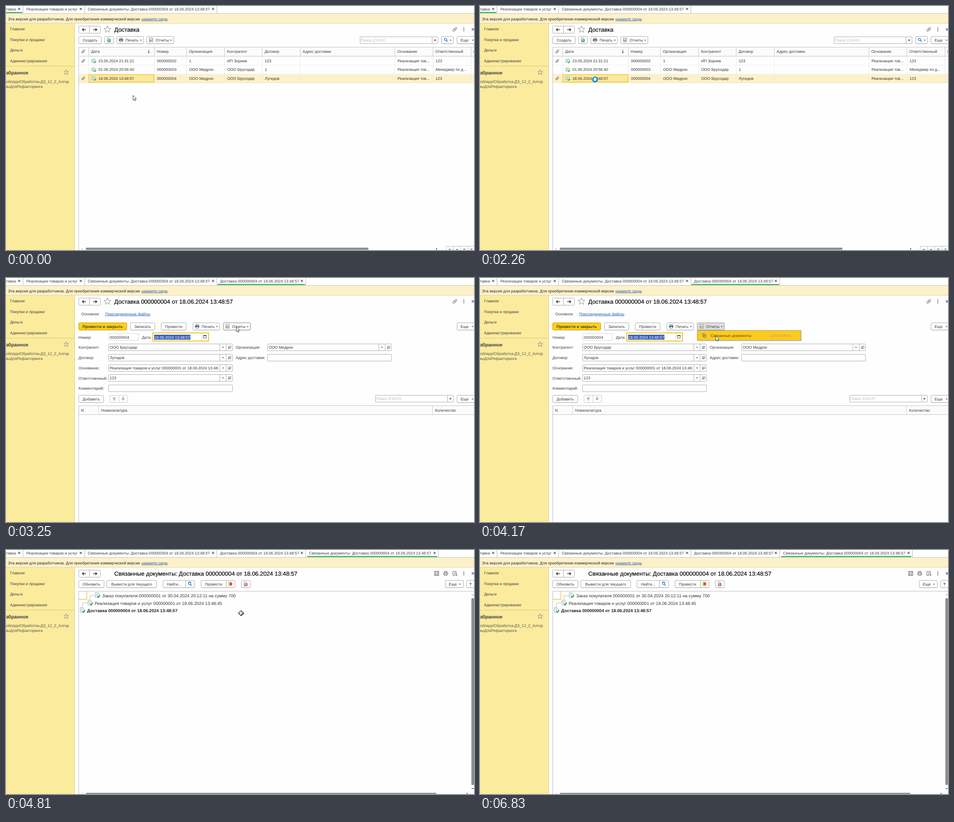
An HTML page that plays this animation: 1033 by 542 pixels, repeating every 7960 ms.

```html
<!DOCTYPE html>
<html lang="ru">
<head>
<meta charset="utf-8">
<title>Доставка</title>
<style>
  html, body { margin: 0; width: 100%; height: 100%; overflow: hidden; background: #fefefe; }
  svg { display: block; width: 100%; height: 100%; }
  text { font-family: "Liberation Sans", Arial, sans-serif; text-rendering: geometricPrecision; white-space: pre; }
</style>
</head>
<body>
<svg id="stage" viewBox="0 0 1033 542" xmlns="http://www.w3.org/2000/svg"></svg>
<script>
const LOOP = 7960, SIZE = 8.6;
const INK = '#3c3c3c', EDGE = '#adadad', GOLD = '#f3c52c', LINK = '#2a5db0', GREEN = '#19a04b', HEAD = '#fbfbfb';

// Drawing helpers; y of a text is the middle of its capitals.
const text = (x, y, s, o = {}) =>
  `<text x="${x}" y="${y + (o.size || SIZE) * .36}" font-size="${o.size || SIZE}" fill="${o.fill || INK}"` +
  ` text-anchor="${o.anchor || 'start'}" font-weight="${o.bold ? 700 : 400}"` +
  `${o.under ? ' text-decoration="underline"' : ''}>${s}</text>`;
const rect = (x, y, w, h, fill, stroke = 'none', r = 0, sw = 1) =>
  `<rect x="${x}" y="${y}" width="${w}" height="${h}" rx="${r}" fill="${fill}" stroke="${stroke}" stroke-width="${sw}"/>`;
const path = (d, stroke = INK, sw = 1, fill = 'none') =>
  `<path d="${d}" stroke="${stroke}" stroke-width="${sw}" fill="${fill}"/>`;
const vline = (x, y1, y2, c = '#d0d0d0') => path(`M${x} ${y1}V${y2}`, c);
const hline = (y, x1, x2, c = '#d0d0d0') => path(`M${x1} ${y}H${x2}`, c);
const at = (x, y, s) => `<g transform="translate(${x} ${y})">${s}</g>`;
const group = (id, s) => `<g id="${id}">${s}</g>`;

const caret = (x, y) => path(`M${x - 2} ${y - 1}h4l-2 2.3z`, 'none', 0, '#444');
const cross = (x, y, r = 2.4, c = '#444') =>
  path(`M${x - r} ${y - r}l${2 * r} ${2 * r}m0 ${-2 * r}l${-2 * r} ${2 * r}`, c, 1.2);
const star = (x, y, r) => {
  let d = '';
  for (let i = 0; i < 10; i++) {
    const a = i * Math.PI / 5, q = i % 2 ? r * .42 : r;
    d += (i ? 'L' : 'M') + (x + q * Math.sin(a)).toFixed(2) + ' ' + (y - q * Math.cos(a)).toFixed(2);
  }
  return path(d + 'z', '#777', .8, 'none');
};
const arrow = (x, y, dir) =>
  path(`M${x - 4 * dir} ${y}H${x + 3 * dir}M${x + .8 * dir} ${y - 3}L${x + 4 * dir} ${y}L${x + .8 * dir} ${y + 3}`, '#333', 1.6);
const tri = (x, y, d, c = '#888') => path(`M${x - 3} ${y + 1.5 * d}h6l-3 ${-3 * d}z`, 'none', 0, c);
const fatArrow = (x, y, d) => path(`M${x - 4} ${y}h2.6v${4 * d}h2.8v${-4 * d}h2.6l-4 ${-4 * d}z`, 'none', 0, '#b0b0b0');

function button(x, y, w, label, o = {}) {
  const tx = o.icon ? x + 20 : x + w / 2;
  return rect(x + .5, y + 1.5, w - 1, 16, '#d8d8d8', 'none', 2) +
    rect(x + .5, y + .5, w - 1, 16, o.fill || '#fdfdfd', o.edge || EDGE, 2) +
    (label ? text(tx, y + 9, label, { anchor: o.icon ? 'start' : 'middle', bold: o.bold, size: o.size }) : '') +
    (o.icon ? at(x + 10, y + 8.5, o.icon) : '') +
    (o.drop ? caret(x + w - 6.5, y + 9) : '');
}
// Button cut off by the right edge of the window.
const more = y => button(995, y, 44, '') + text(1003.5, y + 9, 'Еще') + caret(1030, y + 9);

const clip = path('M2.8-.7L-.9 3.1a1.8 1.8 0 0 1-2.6-2.6L.8-3.7a1.2 1.2 0 0 1 1.8 1.8L-1.4 2a.6.6 0 0 1-.9-.9L1-2', '#555', .8);
const docIcon = rect(-4.5, -3.8, 8, 7, '#f4f8f6', '#8b9da0', .5, .8) +
  path('M-3-1.8h5M-3 0h5M-3 1.8h2.5', '#8b9da0', .7) + path('M.5 2.3l1.8 2L5.3.6', GREEN, 1.6);
const treeIcon = path('M-5-5.5h6l2.5 2.5v8.5h-8.5z', '#8d999c', .8, '#f7f9f9') +
  path('M-3.2-2.5h4.5M-3.2-.5h4.5M-3.2 1.5h3', '#9aa7aa', .7) + path('M-.4 2.6l2 2.3L5.6.5', '#15a340', 2);
const printIcon = rect(-2.8, -4.3, 5.6, 3, '#fff', '#50616e', 0, .9) +
  rect(-4.7, -1.7, 9.4, 4, '#46627d', 'none', 1) + rect(-2.5, .8, 5, 3.5, '#fff', '#46627d', 0, .8);
const reportIcon = rect(-3.7, -4.3, 7.4, 8.4, '#fff', '#777', 0, .9) +
  path('M-1.6 2.6v-4', '#d14a3e', 1.4) + path('M.3 2.6v-2.5', '#3e8a50', 1.4) + path('M2 2.6v-5', '#e0a526', 1.2);
const page = path('M-3.3-4.5h4.2l2.4 2.4v6.6h-6.6z', '#75807a', .9, '#fff');
const copyIcon = page + `<circle cx=".8" cy="1.2" r="3" fill="${GREEN}"/>` + path('M-1 1.2h3.6M.8-.6v3.6', '#fff', .9);
const dropIcon = page + '<circle cx=".6" cy="1.3" r="3" fill="#cf3434"/>' + cross(.6, 1.3, 1.2, '#fff');
const lens = `<circle cx="-.8" cy="-1" r="2.6" fill="#fff" stroke="#2f6fb2" stroke-width="1.3"/>` + path('M1.2 1l2.8 2.8', '#2f6fb2', 1.6);
const linkIcon = `<g transform="rotate(-42)">` + rect(-5.4, -2, 6, 4, 'none', '#777', 2) + rect(-.6, -2, 6, 4, 'none', '#777', 2) + '</g>';
const openIcon = rect(-1.2, -2.8, 4, 4, '#fff', '#555', 0, .8) + path('M-1.2-.8h-1.6v3.6h3.8v-1.6', '#555', .8);
const dots = x => [-3.2, 0, 3.2].map(d => `<circle cx="${x}" cy="${52 + d}" r="1" fill="#444"/>`).join('');

function search(x, y) {
  return rect(x + .5, y + .5, 172, 15, '#fff', EDGE, 1.5) + vline(x + 159.5, y, y + 16, EDGE) +
    text(x + 2, y + 8, 'Поиск (Ctrl+F)', { fill: '#b9b9b9' }) + cross(x + 166, y + 8, 1.7);
}

function heading(title, favourite = true) {
  return rect(160.5, 44.5, 48, 16, '#fdfdfd', EDGE, 2) + vline(184.5, 45, 60, EDGE) +
    arrow(172.5, 52.5, -1) + arrow(196.5, 52.5, 1) +
    (favourite ? star(224, 52, 8) + at(990.5, 52, linkIcon) : '') +
    `<g stroke="#000" stroke-width=".2">${text(239, 52.3, title, { size: 12.9, fill: '#000' })}</g>` +
    dots(1010.5) + cross(1031, 52, 2.8);
}

function tab(x, right, label, end) {
  return (end ? text(end, 6.5, label, { anchor: 'end' }) : text(x, 6.5, label)) +
    cross(right - 8, 6.5, 2.3) + vline(right + .5, 0, 16, '#b8b8b8');
}
const underline = (x, w) => rect(x, 13.5, w, 2, GREEN);

const DOC = 'Доставка 000000004 от 18.06.2024 13:48:57';
const LINKED = 'Связанные документы: ' + DOC;
const FIRM = 'ООО Мидрон', BUYER = 'ООО Брусодар', DEAL = 'Лугидов';

function frame() {
  let s = rect(0, 0, 1033, 542, '#fefefe') + hline(16.5, 0, 1033, '#c4c4c4') +
    tab(0, 37, 'Доставка', 22) + tab(45, 173, 'Реализации товаров и услуг') + tab(180.5, 465, LINKED) +
    rect(0, 17, 1033, 21.5, '#fdf1c8') + hline(38.5, 0, 1033, '#ddd3ad') +
    text(4, 28.5, 'Эта версия для разработчиков. Для приобретения коммерческой версии', { fill: '#222' }) +
    text(299, 28.5, 'нажмите сюда', { fill: LINK, under: true }) + text(357, 28.5, '.') +
    rect(0, 39, 151, 503, '#fbeb9d') + vline(151.5, 39, 542, '#d9cd92') + hline(133.5, 0, 151, '#d9c97c');
  ['Главное', 'Покупки и продажи', 'Деньги', 'Администрирование'].forEach((m, i) => s += text(9, 51.3 + i * 23.4, m));
  return s + text(49.5, 147.8, 'Избранное', { size: 10.75, bold: true, anchor: 'end' }) + star(133, 147.5, 5.8) +
    text(139, 167.5, 'e1cib/app/Обработка.ДЗ_12_2_Алгор', { anchor: 'end', fill: '#555' }) +
    text(81, 178.5, 'итмыДляРефакторинга', { anchor: 'end', fill: '#555' });
}

function listPage() {
  const cols = [182.5, 327.5, 398.5, 482.5, 565.5, 649.5, 858.5, 942.5, 1026.5];
  const names = ['Дата', 'Номер', 'Организация', 'Контрагент', 'Договор', 'Адрес доставки', 'Основание', 'Ответственный', 'Комментарий'];
  const rows = [
    ['23.05.2024 21:31:21', '000000002', '1', 'ИП Зорнев', '123', '', 'Реализация тов...', '123'],
    ['01.06.2024 20:56:40', '000000003', FIRM, BUYER, '1', '', 'Реализация тов...', 'Менеджер по д...'],
    ['18.06.2024 13:48:57', '000000004', FIRM, BUYER, DEAL, '', 'Реализация тов...', '123']
  ];
  let s = underline(0, 36) + heading('Доставка') + button(160, 67, 51, 'Создать') +
    button(217, 67, 21, '', { icon: copyIcon }) + button(244, 67, 60, 'Печать', { icon: printIcon, drop: true }) +
    button(310, 67, 61, 'Отчеты', { icon: reportIcon, drop: true }) + search(781, 68) +
    button(961, 67, 27, '', { icon: lens, drop: true }) + more(67) +
    rect(160.5, 91.5, 900, 20, HEAD, '#c4c4c4') + rect(161, 151.5, 872, 18.5, '#fdf1c8') +
    hline(131.5, 161, 1033, '#efefef') + hline(151, 161, 1033, '#efefef') + hline(170.5, 161, 1033, '#eee3bb') +
    vline(160.5, 91, 542, '#bdbdbd') + at(171, 101, clip);
  cols.forEach((x, i) => s += vline(x, 92, 111, '#c8c8c8') + vline(x, 112, 170, '#eaeaea') + text(x + 5.2, 101.3, names[i]));
  s += rect(183, 152.5, 143.5, 16.5, '#fbe99b', GOLD, 0, 1.4) +
    path('M315.2 97v7.2m-2-2.2l2 2.3 2-2.3', '#444', 1);
  rows.forEach((r, i) => {
    const y = 122 + i * 19.4;
    s += at(193.5, y, docIcon) + (i !== 1 ? at(171, y, clip) : '');
    r.forEach((v, k) => s += text(k ? cols[k] + 5.7 : 204, y, v, { fill: '#333' }));
  });
  s += rect(176, 536.8, 624, 4.8, '#8c8c8c', 'none', 2) + path('M169 537.5v4l-2.2-2z', 'none', 0, '#aaa') +
    path('M949.5 537.3v4.4l2.6-2.2z', 'none', 0, '#444');
  for (let i = 0; i < 4; i++)
    s += rect(971.5 + i * 16, 533.5, 16, 12, '#fafafa', '#c4c4c4') + tri(979.5 + i * 16, 540.5, i < 2 ? 1 : -1);
  return s;
}

function field(x, y, w, value = '', pick = false) {
  return rect(x + .5, y - 7.5, w - 1, 15, '#fff', EDGE, 1.5) + text(x + 3, y + .2, value, { fill: '#333' }) +
    (pick ? vline(x + w - 28.5, y - 7, y + 7, EDGE) + vline(x + w - 14.5, y - 7, y + 7, EDGE) +
      caret(x + w - 21.5, y) + at(x + w - 7, y, openIcon) : '');
}

function formPage() {
  const labels = ['Контрагент:', 'Договор:', 'Основание:', 'Ответственный:', 'Комментарий:'];
  const values = [BUYER, DEAL, 'Реализация товаров и услуг 000000001 от 18.06.2024 13:48:', '123', ''];
  let s = heading(DOC) + text(166, 79.5, 'Основное') + text(219, 79.5, 'Присоединенные файлы', { fill: LINK, under: true }) +
    button(160, 99, 107, 'Провести и закрыть', { fill: '#fbd014', edge: '#c39c10', bold: true, size: 8.9 }) +
    button(274, 99, 55, 'Записать') + button(342, 99, 56, 'Провести') +
    button(412, 99, 60, 'Печать', { icon: printIcon, drop: true }) + more(99) +
    text(160, 131.5, 'Номер:') + rect(226.5, 123.5, 66, 15, '#fff', '#d4d4d4', 1.5) + text(229, 131.5, '000000004') +
    text(300, 131.5, 'Дата:') + rect(324, 122, 123, 18, '#fff', GOLD, 0, 2) +
    rect(327, 126, 80, 11, '#3b5fb4') + text(327.5, 131.5, '18.06.2024 13:48:57', { fill: '#fff' }) +
    vline(432.5, 123, 139) + rect(436, 128, 6, 5.5, '#fff', '#444', 0, .9) + rect(435.6, 127, 6.8, 2, '#444');
  labels.forEach((l, i) => {
    const y = 154 + i * 22.75;
    s += text(160, y + .2, l) + field(226, Math.round(y), 274.5, values[i], i < 4);
  });
  return s + text(507, 154.2, 'Организация:') + field(577, 154, 274.5, FIRM, true) +
    text(507, 177, 'Адрес доставки:') + field(577, 177, 274.5) +
    button(160, 260, 56, 'Добавить') + rect(229.5, 260.5, 39, 16, '#fdfdfd', '#c8c8c8', 2) + vline(249.5, 261, 276) +
    fatArrow(239, 268, 1) + fatArrow(258.5, 268, -1) + search(815, 260) + more(260) +
    rect(160.5, 283.5, 900, 20, HEAD, '#c4c4c4') + vline(160.5, 283, 542, '#bdbdbd') +
    vline(204.5, 284, 303) + vline(941.5, 284, 303) +
    text(165.5, 293.5, 'N') + text(210, 293.5, 'Номенклатура') + text(947, 293.5, 'Количество');
}

const reports = (id, o) => group(id, button(479, 99, 61, 'Отчеты', { icon: reportIcon, drop: true, ...o }));
const menuIcon = rect(-4, -4, 4, 3.5, 'none', '#4470a0', 0, .9) + rect(-.5, .8, 4.5, 3.5, 'none', '#4470a0', 0, .9) +
  path('M-3 0v3h2M1-2.5h2.5v3', '#4470a0', .9);
const menu = () => rect(481, 118, 229, 22.5, '#0002') + rect(479.5, 116.5, 229, 22, '#fccb20', '#a89a6a') +
  at(495, 127.5, menuIcon) +
  text(509, 127.6, 'Связанные документы', { fill: '#5a4a1c' }) + text(640.5, 127.6, 'Ctrl+Shift+S', { fill: '#b5a163' });

function reportPage() {
  const big = { size: 9.66, fill: '#333' };
  const saveIcon = rect(-4.5, -4.5, 9, 9, '#fff', '#555') + path('M-2.5-4v3h5v-3M-2.5 4V1.5h5V4', '#555', .9);
  const paperIcon = rect(-2.8, -4.5, 5.6, 3, '#fff', '#555') + rect(-4.8, -1.5, 9.6, 4, '#fff', '#555', 1) +
    rect(-2.6, .9, 5.2, 3.6, '#fff', '#555', 0, .9);
  const previewIcon = path('M3-1.5v-3h-7v9h3.5', '#555', .9) +
    '<circle cx="1.5" cy="1" r="2.5" fill="#fff" stroke="#555"/>' + path('M3.3 3l2 2', '#555', 1.2);
  const postIcon = rect(-4, -4, 5.5, 7.5, '#f3d46a', '#a08a3c', 0, .8) + path('M-1-4l5 3-2.5 5-4-3z', 'none', 0, '#d9473a');
  return tab(669, 954, LINKED) + underline(665, 287) + heading(LINKED, false) +
    at(950.5, 52, saveIcon) + at(970.5, 52, paperIcon) + at(990.5, 52, previewIcon) +
    button(160, 67, 57, 'Обновить') + button(222, 67, 111, 'Вывести для текущего') +
    button(346, 67, 71, '') + text(371, 76, 'Найти...', { anchor: 'middle' }) + vline(396.5, 68, 83, EDGE) +
    at(406, 75.5, lens + path('M-4-3.5q4-3 7 0', '#2f6fb2', 1)) +
    button(430, 67, 76, '') + text(458, 76, 'Провести', { anchor: 'middle' }) + vline(486.5, 68, 83, EDGE) +
    at(496, 75.5, postIcon) + button(519, 67, 21, '', { icon: dropIcon }) +
    button(969, 67, 41, '') + text(977.5, 76, 'Еще') + caret(1002, 76) +
    button(1016, 67, 24, '') + text(1022.5, 76, '?', { bold: true }) +
    rect(160.5, 91.5, 900, 480, '#fefefe', '#bdbdbd') + path('M161 109.5H178.5V92', GOLD, 1.3) +
    path('M196 101.5H185.5V110M180 117.5H168.5V127', '#b5b5b5', .9) +
    at(202, 100, treeIcon) + at(186, 116.8, treeIcon) + at(169, 133.3, treeIcon) +
    text(212.3, 101.5, 'Заказ покупателя 000000001 от 30.04.2024 20:12:11 на сумму 700', big) +
    text(195.7, 118.3, 'Реализация товаров и услуг 000000001 от 18.06.2024 13:48:45', big) +
    text(179, 135, DOC, { size: 9.6, bold: true, fill: '#222' }) +
    rect(1025.5, 92, 8, 450, '#fafafa') + rect(1027.3, 107, 5.7, 415, '#8c8c8c', 'none', 2) +
    tri(1030, 99.5, .7, '#aaa') + tri(1030, 530, -.7, '#444') +
    rect(161, 537, 864, 5, '#fafafa') + rect(176, 539.5, 774, 4, '#8c8c8c', 'none', 2) +
    path('M169.5 539.5v3h-2z', 'none', 0, '#aaa') + path('M1017 539v3h3z', 'none', 0, '#444');
}

const plus = 'M-1.7-5h3.4v3.3H5v3.4H1.7V5h-3.4V1.7H-5v-3.4h3.3z';
const pointers = {
  arrow: path('M.4.5v10.8l2.5-2.3 1.7 3.7 1.7-.8-1.7-3.5h3.3z', '#333', .9, '#fff'),
  busy: '<circle r="5" fill="#fff" stroke="#2089d5" stroke-width="3.6"/>' + path('M-3.5-3.5A5 5 0 0 1 2-4.6', '#64b8ee', 2.4),
  plus: at(.8, .8, path(plus, '#222', 1, '#222')) + path(plus, '#222', 1, '#fff')
};

const stage = document.getElementById('stage');
stage.innerHTML = frame() + group('list', listPage()) +
  group('docTab', tab(472.5, 661, DOC)) +
  group('form', underline(467, 193) + formPage() + reports('idle') +
    reports('hover', { edge: '#858585' }) + reports('pressed', { fill: '#dedede', edge: '#9a9a9a' }) + group('menu', menu())) +
  group('report', reportPage()) +
  Object.keys(pointers).map(k => group(k, pointers[k])).join('');

// Pointer stops: time, x, y. The pointer jumps between them.
const stops = [
  [0, 280, 198], [280, 276, 194], [400, 270, 188], [520, 264, 182], [670, 258, 172], [820, 257, 168],
  [940, 257, 166], [1210, 254, 163], [2380, 255, 167], [2500, 264, 170], [2620, 312, 171], [2740, 382, 166],
  [2860, 456, 127], [3010, 490, 113], [3130, 504, 109], [3250, 508, 108], [3930, 511, 114], [4050, 517, 123],
  [4170, 520, 128], [4690, 518.5, 140], [4930, 516.5, 156], [5360, 516, 178], [5480, 455, 172], [5600, 360, 152],
  [5720, 275, 137], [5840, 233, 140], [6090, 244, 160], [6210, 446, 270], [6330, 607, 344], [6450, 697, 399],
  [6570, 793, 464], [6690, 829, 501.5]
];
const parts = {};
stage.querySelectorAll('g[id]').forEach(g => parts[g.id] = g);
const show = (id, on) => parts[id].style.display = on ? '' : 'none';
const within = (t, a, b) => t >= a && t < b;

function draw(t) {
  show('list', t < 2380);
  show('docTab', t >= 2380);
  show('form', within(t, 2380, 4690));
  show('report', t >= 4690);
  show('idle', t < 3010);
  show('hover', within(t, 3010, 3680));
  show('pressed', t >= 3680);
  show('menu', t >= 3530);
  const kind = within(t, 2020, 2380) ? 'busy' : t < 4690 ? 'arrow' : t < 6830 ? 'plus' : '';
  const [, x, y] = stops.findLast(s => s[0] <= t);
  for (const k in pointers) {
    show(k, k === kind);
    parts[k].setAttribute('transform', `translate(${x} ${y})`);
  }
}

function tick() {
  draw(performance.now() % LOOP);
  requestAnimationFrame(tick);
}
tick();
</script>
</body>
</html>
```
